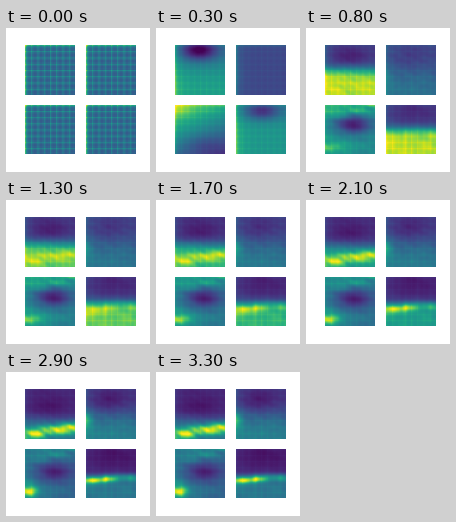
A matplotlib script for the animation above (3.5 s loop, 144 by 144 pixels).

```python
import numpy as np
import matplotlib.pyplot as plt
from matplotlib.animation import FuncAnimation

SIZE, N, STEPS, LAST = 144, 64, 35, 33
axis = (np.arange(N) + 0.5) / N
u, v = np.meshgrid(axis, axis)
rng = np.random.default_rng(4)


def blob(cx, cy, sx, sy):
    return np.exp(-((u - cx) / sx) ** 2 - ((v - cy) / sy) ** 2)


def ramp(step, start, end):
    return np.clip((step - start) / (end - start), 0, 1)


def layers(top, low, edge, width):
    return top + (low - top) / (1 + np.exp((edge - v) / width))


def ridge(y, slant, width):
    return np.exp(-((v - y + slant * (u - 0.5)) / width) ** 2)


def mottle(waves=14):
    total = np.zeros((N, N))
    for _ in range(waves):
        a, b = rng.normal(0, (14, 20))
        total += np.cos(a * u + b * v + rng.uniform(0, 2 * np.pi))
    return total / np.sqrt(waves)


def checks():
    """Bright lines every eight cells over a finer weave."""
    i = np.arange(N) % 8
    row = np.exp(-i / 0.8) + 0.22 * (i % 4 == 2)
    return row[:, None] + row[None, :] - 0.5


GRID = checks()
CORNER = np.exp(-u / 0.035) + 0.6 * np.exp(-v / 0.035)
LEFT = np.exp(-u / 0.13)


# Each mix() call blends a value through the early, broad and late stages.
def top_left(mix, noise):
    f = layers(mix(.37, .18, .11), mix(.58, .9, .38), mix(.45, .5, .6), mix(.15, .06, .07))
    f -= mix(.42, .1, .07) * blob(.48, mix(.1, .25, .38), .36, .2)
    f += mix(0, 0, .5) * ridge(mix(.8, .78, .84), .15, .12) * (1 + .22 * noise)
    return f + mix(.12, .08, .03) * LEFT


def top_right(mix, noise):
    f = layers(mix(.22, .21, .15), mix(.22, .37, .43), .53, .11)
    f -= mix(0, .04, .09) * blob(.45, .22, .35, .2)
    return f + mix(.03, .04, .25) * blob(0, .62, .12, .15) + .07 * LEFT


def low_left(mix, noise):
    f = mix(.47, .5, .37) - mix(.45, 0, 0) * (v - .5) - mix(.2, .06, .1) * (u - .5)
    f -= mix(.08, .42, .28) * blob(.55, mix(.8, .4, .47), .38, .2)
    f += mix(.05, .3, .2) * ridge(.1, .12, .12) * u * (1 + .3 * noise)
    f += mix(.12, .14, 0) * blob(.08, .08, .25, .15)
    return f + mix(0, .16, .52) * blob(.1, .86, mix(.3, .28, .15), .14) * (1 + .15 * noise)


def low_right(mix, noise):
    f = layers(mix(.42, .17, .09), mix(.53, .9, .4), mix(.3, .5, .54), mix(.1, .05, .04))
    f -= mix(.3, .05, .04) * blob(.52, .12, .35, .18)
    glow = .14 + .44 * np.exp(-((u - .25) / .42) ** 2)
    f += mix(0, 0, 1) * ridge(mix(.65, .66, .61), .07, mix(.1, .1, .07)) * glow * (1 + .18 * noise)
    return f + mix(.14, .05, .02) * LEFT


PANELS = [(draw, mottle()) for draw in (top_left, top_right, low_left, low_right)]


def render(panel, step):
    draw, noise = panel
    wake, spread, refine = ramp(step, 0, 3), ramp(step, 3, 8), ramp(step, 8, 27)

    def mix(early, broad, late):
        value = early + (broad - early) * spread
        return value + (late - value) * refine

    f = .37 + (draw(mix, noise) - .37) * wake
    f += .03 * spread * noise * (.2 + f)
    f += (.06 + .24 * (1 - wake)) * GRID * (.2 + f)
    return np.clip(f + (.02 + .3 * np.exp(-step / 3)) * CORNER, 0, 1)


fig = plt.figure(figsize=(SIZE / 100, SIZE / 100), dpi=100)
images = []
for n, panel in enumerate(PANELS):
    x, y = 19 + 61 * (n % 2), 17 + 60 * (n // 2)
    height = 50 - n // 2
    ax = fig.add_axes([x / SIZE, 1 - (y + height) / SIZE, 50 / SIZE, height / SIZE])
    ax.axis("off")
    images.append(ax.imshow(render(panel, 0), cmap="viridis", vmin=0, vmax=1, aspect="auto"))


def update(frame):
    for panel, image in zip(PANELS, images):
        image.set_data(render(panel, min(frame, LAST)))
    return images


anim = FuncAnimation(fig, update, frames=STEPS, interval=100,
                     repeat=True, repeat_delay=0)
plt.show()
```
